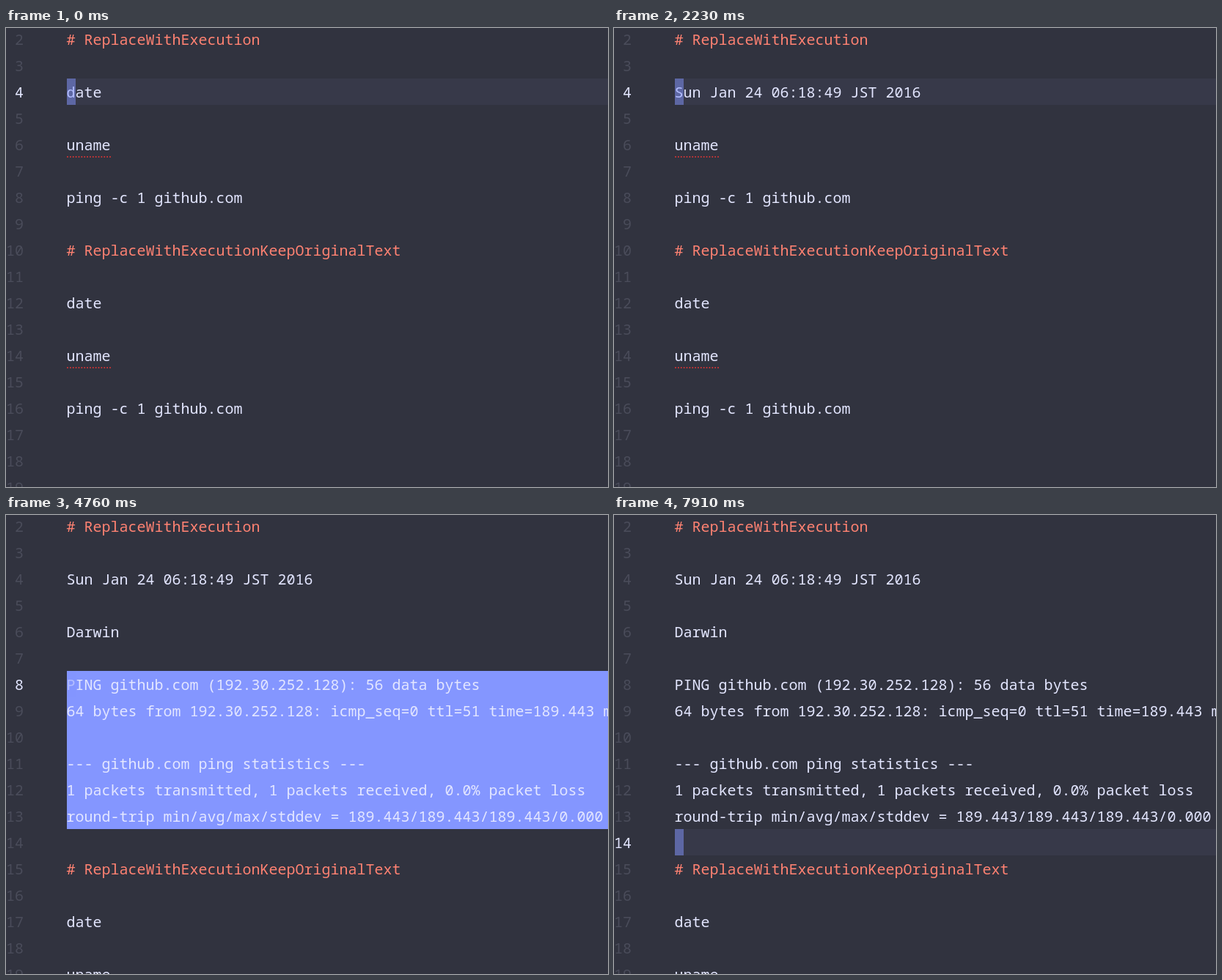
Animation of 821x627 px, one loop 8000 ms. Source, as an HTML page:

```html
<!DOCTYPE html>
<html lang="en">
<head>
<meta charset="utf-8">
<title>Replace with execution</title>
<style>
  html, body { margin: 0; width: 100%; height: 100%; overflow: hidden; background: #31333f; }
  svg { display: block; }
  text { font: 20px "Noto Sans Mono", "DejaVu Sans Mono", monospace; fill: #e3e6ff; white-space: pre; }
  .heading { fill: #ff8272; }
  .number { fill: #4a4c5a; text-anchor: end; }
  .current { fill: #e3e6ff; }
  .row { fill: #373949; }
  .select { fill: #8496ff; }
  .cursor { fill: #8496ff; fill-opacity: .5; }
  .typo { stroke: #dc3535; stroke-width: 2; stroke-linecap: round; stroke-dasharray: 0 3.867; }
</style>
</head>
<body>
<svg id="editor" width="821" height="627" viewBox="0 0 821 627"></svg>
<script>
const LOOP = 8000, WIDTH = 821, LEFT = 83, CHAR = 12, ROW = 36, FIRST = 2;
const FLASH = 150; // how long fresh output stays selected
const editor = document.getElementById("editor");

const commands = ["date", "uname", "ping -c 1 github.com"];
const outputs = [
  ["Sun Jan 24 06:18:49 JST 2016"],
  ["Darwin"],
  [
    "PING github.com (192.30.252.128): 56 data bytes",
    "64 bytes from 192.30.252.128: icmp_seq=0 ttl=51 time=189.443 ms",
    "",
    "--- github.com ping statistics ---",
    "1 packets transmitted, 1 packets received, 0.0% packet loss",
    "round-trip min/avg/max/stddev = 189.443/189.443/189.443/0.000 ms"
  ]
];

// Times of cursor blinks, command runs and steps one line down
const blinks = [300, 600, 890, 1340, 1780];
const runs = [2080, 3270, 4760];
const downs = [2670, 2820, 3710, 3860, 6410, 6560, 6560, 6710, 6710, 7910];

const passed = (times, t) => times.filter(time => time <= t).length;
const rowTop = n => (n - FIRST) * ROW - 3;
const rect = (cls, x, y, w, h) =>
  `<rect class="${cls}" x="${x}" y="${y}" width="${w}" height="${h}"/>`;
const label = (cls, x, n, str) =>
  `<text class="${cls}" x="${x}" y="${rowTop(n) + 26}">${str}</text>`;

function buildLines(done) {
  const lines = ["# ReplaceWithExecution", ""];
  commands.forEach((cmd, i) => lines.push(...(i < done ? outputs[i] : [cmd]), ""));
  lines.push("# ReplaceWithExecutionKeepOriginalText", "");
  commands.forEach(cmd => lines.push(cmd, ""));
  return lines;
}

// Height cut from the top of the cursor while it blinks
function cursorCut(t) {
  const count = passed(blinks, t);
  if (!count || t >= runs[0]) return 0;
  return count % 2 ? 22 : ROW;
}

function render(t) {
  const line = 4 + passed(downs, t);
  const done = passed(runs, t);
  const lines = buildLines(done);
  const cut = cursorCut(t);

  let svg = rect("row", LEFT, rowTop(line), WIDTH - LEFT, ROW);
  if (done && t < runs[done - 1] + FLASH) {
    const fresh = outputs[done - 1];
    const w = fresh.length > 1 ? WIDTH - LEFT : fresh[0].length * CHAR;
    svg += rect("select", LEFT, rowTop(line), w, fresh.length * ROW);
  }
  for (let n = FIRST; n < 20; n++) {
    const str = lines[n - FIRST] || "";
    svg += label(n === line ? "number current" : "number", 24, n, n);
    svg += label(str[0] === "#" ? "heading" : "code", LEFT - 0.5, n, str);
    if (str === "uname")
      svg += `<path class="typo" d="M84 ${rowTop(n) + 35}h58.1"/>`;
  }
  return svg + rect("cursor", LEFT, rowTop(line) + cut, CHAR, ROW - cut);
}

let shown;
function tick() {
  const svg = render(performance.now() % LOOP);
  if (svg !== shown) editor.innerHTML = shown = svg;
  requestAnimationFrame(tick);
}
tick();
</script>
</body>
</html>
```
